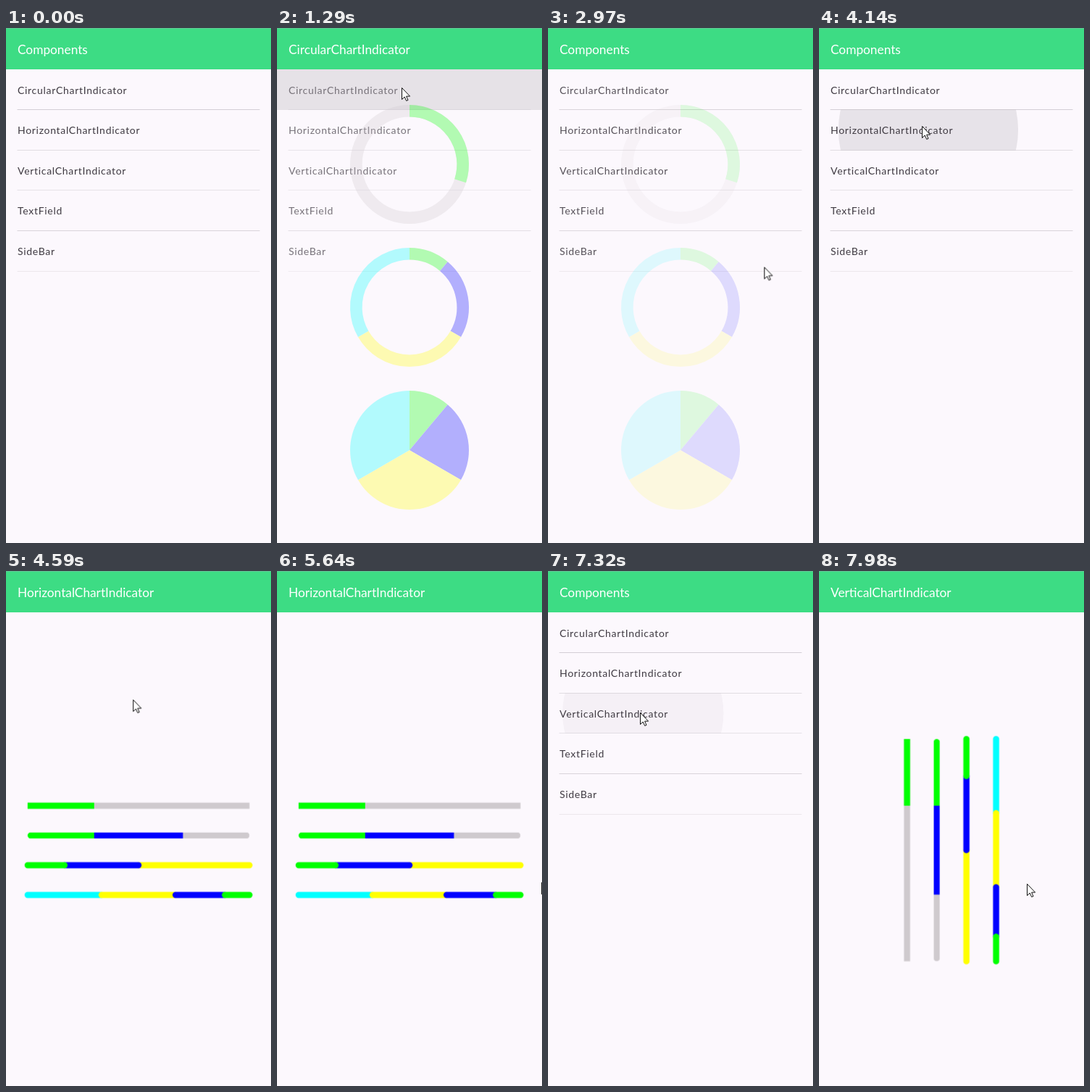
Write an HTML page that moves like this. It is 366 by 710 pixels and loops after 8000 ms.

```html
<!DOCTYPE html>
<html lang="en">
<head>
<meta charset="utf-8">
<title>Components</title>
<style>
  html, body { margin: 0; width: 100%; height: 100%; overflow: hidden; background: #fcf8fd; }
  svg { display: block; }
  text { font-family: Lato, "Open Sans", sans-serif; user-select: none; }
  .title { font-size: 17.3px; fill: #fff; }
  .item { font-size: 14px; letter-spacing: .7px; fill: #3f3a42; }
</style>
</head>
<body>
<svg id="stage" width="366" height="710" viewBox="0 0 366 710"></svg>
<script>
const LOOP = 8000;
const FADE = 300;
const STANDARD = 'cubic-bezier(.4, 0, .2, 1)';
const GREEN = '#0f0', BLUE = '#00f', YELLOW = '#ff0', CYAN = '#0ff', GRAY = '#cfcace';
const ROW = 55.6, TOP = 57;
const stage = document.getElementById('stage');

function add(parent, tag, attrs = {}, text = '') {
  const el = document.createElementNS('http://www.w3.org/2000/svg', tag);
  for (const key in attrs) el.setAttribute(key, attrs[key]);
  el.textContent = text;
  parent.append(el);
  return el;
}

// steps: [ms, value, easing to the next step]
function play(el, prop, steps) {
  const full = [[0, steps[0][1]], ...steps, [LOOP, steps.at(-1)[1]]];
  el.animate(full.map(([ms, value, easing = 'linear']) =>
    ({ offset: ms / LOOP, [prop]: value, easing })),
    { duration: LOOP, iterations: Infinity });
}

// ---- screens ----
const screens = {};
for (const name of ['list', 'circular', 'horizontal', 'vertical']) screens[name] = add(stage, 'g');

const items = ['CircularChartIndicator', 'HorizontalChartIndicator', 'VerticalChartIndicator', 'TextField', 'SideBar'];
const dividerAlpha = [.75, .5, .4, .65, .3];
const titles = {
  list: 'Components', circular: items[0], horizontal: items[1], vertical: items[2]
};

const ripples = add(screens.list, 'g');
items.forEach((label, i) => {
  add(screens.list, 'text', { class: 'item', x: 16, y: 90.5 + ROW * i }, label);
  add(screens.list, 'rect', {
    x: 15.5, y: Math.round(112 + 55.7 * i), width: 335, height: 1, fill: '#c6c1c8', opacity: dividerAlpha[i]
  });
});

function polar(cy, r, deg) {
  const a = deg * Math.PI / 180;
  return `${183 + r * Math.sin(a)} ${cy - r * Math.cos(a)}`;
}

function arc(cy, r, from, to, color, pie) {
  const start = pie ? `M183 ${cy}L` : 'M';
  add(screens.circular, 'path', {
    d: `${start}${polar(cy, r, from)}A${r} ${r} 0 0 1 ${polar(cy, r, to)}${pie ? 'Z' : ''}`,
    fill: pie ? color : 'none', stroke: pie ? 'none' : color, 'stroke-width': 16.6
  });
}

const RING = 73.7, PIE = 82;
const slices = [[0, 40, GREEN], [40, 120, BLUE], [120, 240, YELLOW], [240, 360, CYAN]];
add(screens.circular, 'circle', { cx: 183, cy: 188, r: RING, fill: 'none', stroke: GRAY, 'stroke-width': 16.6 });
arc(188, RING, 0, 108, GREEN);
for (const slice of slices) {
  arc(385, RING, ...slice);
  arc(582, PIE, ...slice, true);
}

const LENGTH = 306.5, THICK = 8.4;
const pill = add(add(stage, 'defs'), 'clipPath', { id: 'pill' });
add(pill, 'rect', { y: 41 - THICK / 2, width: LENGTH, height: THICK, rx: THICK / 2 });

// Each segment is [from, to, color] as a share of the bar; later ones lie on top.
const bars = [
  { segments: [[0, 1, GRAY], [0, .3, GREEN]] },
  { segments: [[0, 1, GRAY], [0, .3, GREEN], [.3, .7, BLUE]], clip: 'url(#pill)' },
  { segments: [[1 / 2, 1, YELLOW], [1 / 6, 1 / 2, BLUE], [0, 1 / 6, GREEN]], cap: 'round' },
  { segments: [[0, 1 / 3, CYAN], [1 / 3, 2 / 3, YELLOW], [2 / 3, 8 / 9, BLUE], [8 / 9, 1, GREEN]], cap: 'round' }
];

function drawBars(parent, transform) {
  const chart = add(parent, 'g', { transform, 'stroke-width': THICK });
  bars.forEach(({ segments, cap = 'butt', clip = 'none' }, i) => {
    const bar = add(chart, 'g', { 'stroke-linecap': cap, 'clip-path': clip });
    for (const [from, to, stroke] of segments)
      add(bar, 'line', { x1: from * LENGTH, x2: to * LENGTH, y1: 41 * i, y2: 41 * i, stroke });
  });
}
drawBars(screens.horizontal, 'translate(29.8 323.6)');
drawBars(screens.vertical, 'matrix(0 1 1 0 121.6 231.6)');

// ---- header ----
add(stage, 'rect', { width: 366, height: TOP, fill: '#3ddc84' });
add(stage, 'rect', { width: 366, height: 1, fill: '#62c596' });

// ---- navigation ----
const visits = [
  [1209, 'circular'], [2790, 'list'], [4209, 'horizontal'], [5660, 'list'], [7421, 'vertical']
];
for (const name in screens) {
  const title = add(stage, 'text', { class: 'title', x: 16, y: 36 }, titles[name]);
  let shown = name === 'list' ? 1 : 0;
  const fade = [[0, shown]], cut = [[0, shown]];
  for (const [ms, target] of visits) {
    const next = target === name ? 1 : 0;
    if (next === shown) continue;
    fade.push([ms, shown, STANDARD], [ms + FADE, next]);
    cut.push([ms, shown], [ms, next]);
    shown = next;
  }
  play(screens[name], 'opacity', fade);
  play(title, 'opacity', cut);
}

// ---- touch ripples: [press ms, first visible ms, x] ----
const INK = .14;
[[1092, 1130, 172], [4092, 4130, 142], [7304, 7305, 127]].forEach(([press, seen, x], i) => {
  const clip = add(stage.querySelector('defs'), 'clipPath', { id: 'row' + i });
  add(clip, 'rect', { y: TOP + ROW * i, width: 366, height: ROW });
  const holder = add(ripples, 'g', { 'clip-path': `url(#row${i})` });
  const ink = add(holder, 'circle', { cy: TOP + ROW * (i + .5), fill: '#1d1b20' });
  const end = press + 225;
  play(ink, 'r', [[press, '110px', STANDARD], [end, '195px']]);
  play(ink, 'cx', [[press, x + 'px'], [end, '183px']]);
  play(ink, 'opacity', [[seen, 0], [seen, INK * (seen - press) / 75], [press + 75, INK], [end, INK], [end + 150, 0]]);
});

// ---- pointer ----
const pointer = add(stage, 'path', {
  d: 'M.5 .5V16.5L4.2 13L6.7 18.4L9 17.4L6.6 12.1H11.6Z',
  fill: '#fff', stroke: '#111', 'stroke-width': 1, 'stroke-linejoin': 'round'
});
const at = (x, y) => `translate(${x}px, ${y}px)`;
play(pointer, 'transform', [
  [0, at(368, 53)],
  [80, at(368, 53), 'cubic-bezier(.3, .3, .4, 1)'],
  [870, at(172, 82)],
  [1400, at(172, 82), 'cubic-bezier(.4, 0, .5, 1)'],
  [1930, at(319, 340)],
  [1970, at(319, 340), 'ease-out'],
  [2070, at(303, 335)],
  [2880, at(303, 335), 'cubic-bezier(.4, 0, .6, .9)'],
  [3570, at(166, 168), 'ease-out'],
  [3870, at(142, 135)],
  [4380, at(142, 135), 'cubic-bezier(.4, 0, .8, .8)'],
  [4920, at(298, 333), 'cubic-bezier(.2, .4, .5, 1)'],
  [5280, at(365, 429)],
  [5640, at(365, 429)],
  [5720, at(358, 434), 'cubic-bezier(.4, 0, .6, .9)'],
  [6430, at(170, 198), 'ease-out'],
  [6680, at(133, 189)],
  [6840, at(127, 195)],
  [7480, at(127, 195), 'cubic-bezier(.4, 0, .4, 1)'],
  [7970, at(287, 431)]
]);
</script>
</body>
</html>
```
